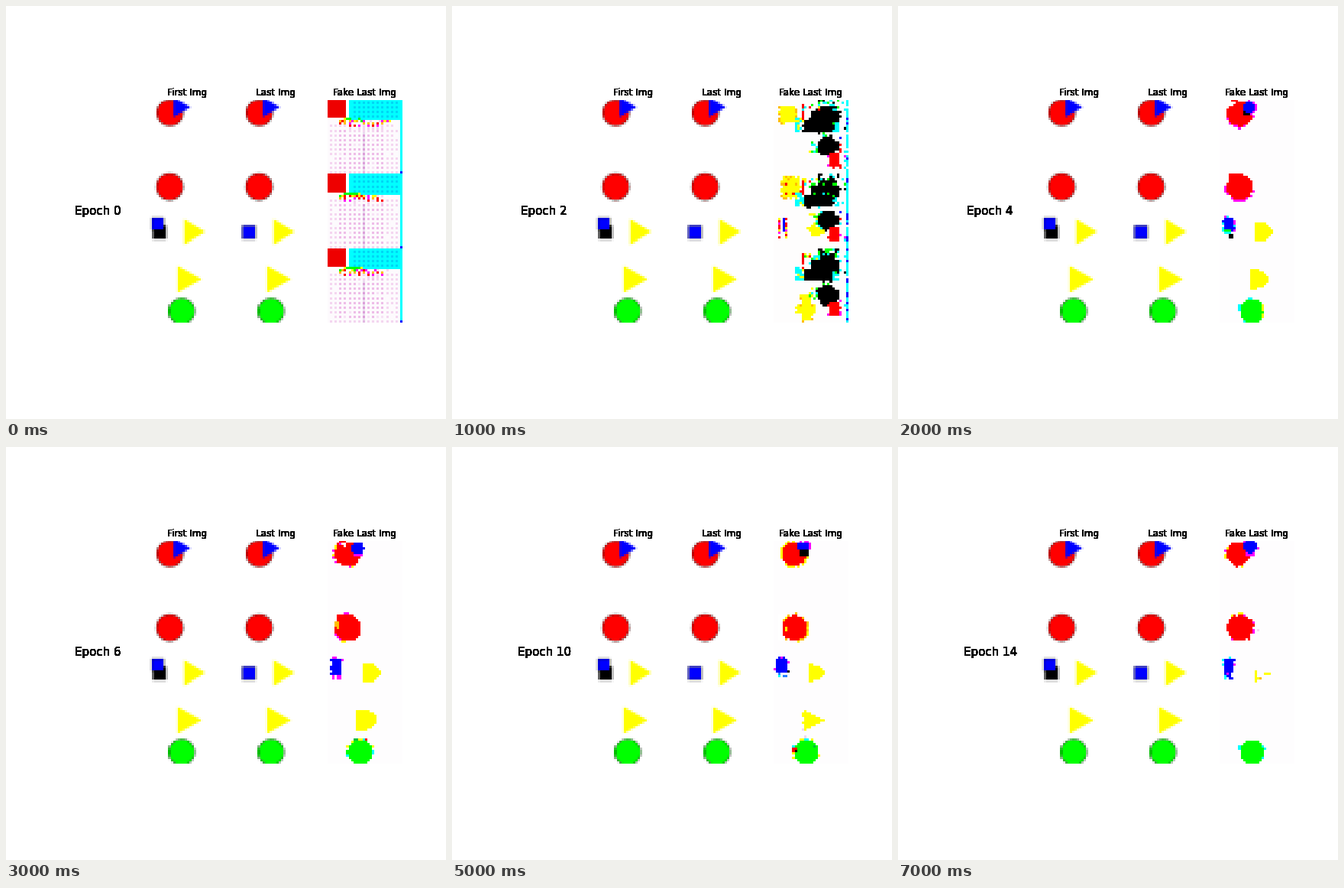
A matplotlib script for the animation above (7.5 s loop, 576 by 540 pixels).

```python
import matplotlib.pyplot as plt
import numpy as np
from matplotlib.animation import FuncAnimation

EPOCHS = 15
CELLS = 32
ROWS = 3 * CELLS
RGB = dict(R=(255, 0, 0), G=(0, 255, 0), B=(0, 0, 255), Y=(255, 255, 0),
           C=(0, 255, 255), M=(255, 0, 255), K=(0, 0, 0), W=(255, 255, 255),
           P=(244, 214, 240), D=(0, 190, 60), O=(255, 190, 0), L=(40, 130, 255))


class Canvas:
    """A 32 x 96 cell picture; `scale` subdivides cells for smooth edges."""

    def __init__(self, seed=0, bg=(255, 255, 255), scale=1):
        self.rng = np.random.default_rng(seed)
        self.scale = scale
        self.a = np.full((ROWS * scale, CELLS * scale, 3), bg, float)
        gy, gx = np.mgrid[:ROWS * scale, :CELLS * scale]
        self.x, self.y = (gx + 0.5) / scale, (gy + 0.5) / scale

    def fill(self, mask, color, rim="", p=0.6, side=(0, 0)):
        self.a[mask] = RGB[color]
        if not rim or not mask.any():
            return
        big = np.pad(mask, 1)
        ring = (big[2:, 1:-1] | big[:-2, 1:-1] | big[1:-1, 2:] | big[1:-1, :-2]) & ~mask
        dx, dy = self.x - self.x[mask].mean(), self.y - self.y[mask].mean()
        ring &= dx * side[0] + dy * side[1] >= 0
        self.scatter(ring, rim, p)

    def scatter(self, mask, colors, p):
        hit = np.argwhere(mask & (self.rng.random(mask.shape) < p))
        for i, j in hit:
            self.a[i, j] = RGB[colors[self.rng.integers(len(colors))]]

    def area(self, x, y, w, h):
        return (self.x >= x) & (self.x < x + w) & (self.y >= y) & (self.y < y + h)

    def box(self, x, y, w, h, color, *rim):
        self.fill(self.area(x, y, w, h), color, *rim)

    def disc(self, x, y, r, color, *rim):
        self.fill(np.hypot(self.x - x, self.y - y) < r, color, *rim)

    def tri(self, x, y, w, h, color, *rim):
        t = (self.x - x) / w
        self.fill((t >= 0) & (np.abs(self.y - y) < h / 2 * (1 - t)), color, *rim)

    def dome(self, x, y, w, h, color, *rim):
        t = (self.x - x) / w
        self.fill((t >= 0) & (np.hypot(t, (self.y - y) * 2 / h) < 1), color, *rim)

    def spray(self, x, y, w, h, colors, p):
        self.scatter(self.area(x, y, w, h), colors, p)

    def image(self):
        s = self.scale
        a = self.a.reshape(ROWS, s, CELLS, s, 3).mean(axis=(1, 3))
        return a.round().astype(np.uint8)


def real(first):
    c = Canvas(scale=8)

    def square(x, y, size, color):
        c.box(x, y, size, size, "K")
        c.box(x + 0.25, y + 0.25, size - 0.5, size - 0.5, color)

    for x, y, color in ((8.7, 5.85, "R"), (8.6, 37.6, "R"), (13.7, 91, "G")):
        c.disc(x, y, 5.75, "K")
        c.disc(x, y, 5.5, color)
    c.tri(10.1, 3.4, 7.4, 8.8, "B")
    c.tri(14.7, 57, 9.3, 11, "Y")
    c.tri(11.9, 77.4, 10.5, 11.6, "Y")
    square(1.4, 54.3, 5.8, "K")
    if first:
        square(0.9, 50.9, 5.4, "B")
    else:
        square(1.4, 54.3, 5.8, "B")
    return c.image()


def start():
    c = Canvas(5, (253, 250, 253))
    odd_col = np.floor(c.x) % 2 == 1
    dots = odd_col & (np.floor(c.y) % 2 == 1)
    for y in (0, 32, 64):
        c.scatter(dots & c.area(0, y + 10, 31, 22), "P", 0.9)
        c.a[dots & c.area(5, y + 12, 20, 18)] -= (6, 24, 8)
        c.a[c.area(15, y + 13, 1, 19)] -= (18, 30, 14)
        c.box(9, y, 23, 8.6, "C")
        c.a[dots & c.area(10, y, 21, 8)] = (0, 215, 245)
        c.box(8, y, 1, 9, "W")
        c.box(0, y + 8, 9, 1, "W")
        c.a[c.area(0, y, 8, 8)] = (238, 0, 0)
        c.spray(7, y + 8, 8, 1, "GGYC", 0.9)
        c.spray(5, y + 9, 11, 1, "RYMOG", 0.8)
        c.spray(16, y + 9, 11, 1, "MWYP", 0.6)
        c.scatter(odd_col & c.area(5, y + 10, 20, 1), "RMO", 0.8)
        c.scatter(odd_col & c.area(7, y + 11, 18, 1), "RMP", 0.55)
        c.scatter(odd_col & c.area(9, y + 12, 16, 2), "P", 0.7)
        c.box(31, y, 1, 31, "C")
        c.box(31, y + 31, 1, 1, "B")
    return c.image()


def wild(seed):
    c = Canvas(seed, (254, 253, 253))
    c.box(3, 3, 6, 7, "Y", "YO", 0.45)
    c.box(4, 34, 7, 8, "Y", "YO", 0.45)
    c.spray(4, 34, 9, 8, "OYR", 0.25)
    c.disc(18.5, 56, 3.2, "Y", "YW", 0.5)
    for x in (2, 5):
        c.spray(x, 51, 1, 9, "RMYR", 0.7)
    c.box(4, 51, 1, 6, "B")
    c.box(12, 84, 4, 11, "Y", "YO", 0.4)
    c.box(10, 89, 8, 3, "Y", "Y", 0.4)
    for y in (0, 32, 64):
        c.spray(12, y + 2, 9, 3, "CRWGY", 0.4)
        c.spray(19, y, 9, 4, "CKKG", 0.45)
        c.spray(9, y + 8, 4, 6, "CCCY", 0.85)
        c.spray(25, y + 10, 3, 4, "C", 0.9)
        c.box(20, y + 3, 6, 2, "K", "KCG", 0.4)
        c.box(16, y + 5, 12, 5, "K", "KKCG", 0.3)
        c.box(13, y + 9, 12, 5, "K", "KKCG", 0.3)
        c.spray(12, y + 2, 1, 7, "R", 0.8)
        c.spray(15, y + 17, 4, 6, "CYGW", 0.35)
        c.disc(23, y + 20, 3.9, "K", "KKGC", 0.45)
        c.box(21, y + 18, 7, 4, "K")
        c.box(24, y + 23, 4, 5.6, "R", "MKRW", 0.3)
        c.spray(28, y + 16, 3, 14, "MRBC", 0.12)
        c.spray(29, y, 2, 16, "CGK", 0.06)
        c.spray(31, y, 1, 32, "CCCCB", 0.92)
    return c.image()


def scene4(c):
    c.disc(8.7, 6.1, 5.5, "R", "M", 0.8, (0, 1))
    c.spray(4, 1, 4, 2, "W", 0.8)
    c.box(5, 0, 3, 1, "R")
    c.box(7, 1, 1, 2, "R")
    c.box(10, 5, 3, 2, "K")
    c.disc(12.6, 3.5, 2.6, "B", "M", 0.8, (1, -0.2))
    c.disc(8.6, 37.8, 5.5, "R", "M", 0.6, (-0.3, 1))
    c.spray(4, 33, 4, 1, "W", 1)
    c.box(4, 32, 4, 1.6, "R")
    c.box(2, 51, 4, 6, "B", "MBC", 0.6)
    c.spray(2, 56, 4, 2, "CGB", 0.7)
    c.box(4, 58, 2, 2, "K")
    c.dome(15, 57, 7.7, 8.8, "Y")
    c.dome(12.7, 77.4, 8.6, 9, "Y")
    c.disc(13.8, 91, 5.3, "G", "C", 0.7, (-1, 0))
    c.spray(18, 88, 1, 6, "Y", 0.8)


def scene6(c):
    c.disc(8.6, 6, 5.4, "R", "MY", 0.5, (-1, 0.5))
    c.spray(4, 1, 4, 2, "WR", 0.6)
    c.box(5, 0, 3, 1, "R")
    c.box(11, 5, 4, 2, "M")
    c.disc(12.7, 3.4, 2.9, "B")
    c.disc(8.8, 37.8, 5.6, "R", "YM", 0.35, (-1, 0))
    c.spray(3, 35, 2, 3, "YOW", 0.7)
    c.box(4, 32, 4, 1.6, "R")
    c.box(2, 51, 4, 7, "B", "BM", 0.4)
    for x in (2, 4, 5):
        c.box(x, 58, 1, 2, "M")
    c.dome(15, 57, 7.7, 8.8, "Y")
    c.dome(12.2, 77.4, 9.2, 9.6, "Y")
    c.disc(13.9, 91, 5.5, "G", "CY", 0.4)
    c.spray(11, 85, 6, 1, "YRD", 0.6)


def scene8(c):
    c.box(4, 0, 6, 8, "R", "YR", 0.5, (-1, 0.5))
    c.spray(4, 7, 6, 3, "RRW", 0.6)
    c.disc(12.3, 3.6, 3, "M", "MW", 0.4)
    for x in (9, 11, 13):
        c.spray(x, 0, 1, 10, "M", 0.7)
    c.box(12, 3, 3, 2, "B")
    c.disc(8.7, 37.6, 4.9, "R", "YM", 0.6)
    c.spray(3, 36, 3, 5, "YRO", 0.6)
    for x in (4, 6, 9, 11):
        c.spray(x, 40, 1, 3, "YRM", 0.6)
        c.spray(x + 1, 41, 1, 3, "W", 0.9)
    c.box(2, 51, 4, 7, "B", "BM", 0.35)
    c.spray(3, 56, 3, 3, "LCB", 0.5)
    c.spray(2, 59, 4, 1, "MW", 0.7)
    c.dome(15, 57, 7, 8, "Y")
    c.tri(13.2, 77.4, 8, 8.5, "Y", "OY", 0.3, (-1, 0))
    c.disc(13.7, 91, 5.3, "G", "YOD", 0.4)
    c.spray(10, 87, 8, 8, "D", 0.18)


def scene10(c):
    c.disc(8.8, 5.9, 5.3, "R", "Y", 0.8)
    c.box(11, 4, 4, 3, "K")
    c.box(10, 1, 5, 3, "B", "M", 0.5, (0.5, -1))
    c.disc(9, 37.7, 5.4, "R", "YO", 0.75)
    c.spray(2, 32, 2, 11, "W", 1)
    c.box(5, 37, 1, 2, "Y")
    c.box(1, 51, 5, 6, "B", "BM", 0.3)
    c.spray(2, 57, 4, 2, "LCW", 0.7)
    c.box(6, 56, 1, 1, "K")
    c.dome(15, 57, 6.7, 7.4, "Y")
    c.tri(13.2, 77.4, 8.6, 8.5, "Y", "YP", 0.35, (-1, 0))
    c.spray(12, 82, 3, 4, "PC", 0.2)
    c.disc(13.9, 91, 5.3, "G", "CY", 0.4)
    c.spray(8, 89, 2, 2, "RKD", 0.8)
    c.spray(10, 87, 8, 8, "D", 0.05)


def scene14(c):
    c.disc(8, 5.8, 5, "R", "MYR", 0.5, (-1, 0.4))
    c.box(11, 4, 4, 3, "M")
    c.disc(12.8, 2.7, 2.9, "B", "BM", 0.3)
    c.disc(8.7, 37.8, 5.4, "R", "YRM", 0.4)
    c.box(16, 38, 1, 1, "P")
    c.box(2, 51, 4, 6, "B", "BCM", 0.5)
    c.spray(2, 57, 4, 3, "MBC", 0.6)
    c.box(15, 56, 1, 5, "Y")
    c.spray(16, 58, 4, 2, "YO", 0.4)
    c.box(20, 57, 1, 1, "Y")
    c.box(19, 56.6, 3, 1, "Y")
    c.disc(13.8, 91, 5.3, "G", "C", 0.55, (1, 0.6))
    c.spray(8, 88, 1, 4, "YC", 0.5)


def scene12(c):
    scene14(c)
    c.tri(13.2, 77.4, 7, 7, "Y", "Y", 0.3)
    c.spray(20, 50, 9, 10, "YP", 0.06)


SCENES = {4: scene4, 6: scene6, 8: scene8, 10: scene10, 12: scene12, 14: scene14}


def fake(epoch):
    if epoch == 0:
        return start()
    if epoch < 3:
        return wild(epoch)
    c = Canvas(epoch, (254, 253, 254))
    SCENES[epoch + epoch % 2](c)
    return c.image()


plt.rcParams.update({"font.family": "DejaVu Sans", "font.size": 10,
                     "figure.subplot.bottom": 0.125})
fig, axes = plt.subplots(1, 4, figsize=(8, 7.5), dpi=72)
for ax in axes:
    ax.axis("off")


def heavy(ax, x, y, text, **kw):
    # stacked copies harden the antialiased edges
    return [ax.annotate(text, (x, y), xycoords="axes fraction", ha="center", **kw)
            for _ in range(25)]


fakes = [fake(e) for e in range(EPOCHS)]
pictures = (real(True), real(False), fakes[0])
titles = ("First Img", "Last Img", "Fake Last Img")
for ax, pic, title in zip(axes[1:], pictures, titles):
    shown = ax.imshow(pic, interpolation="nearest")
    heavy(ax, 0.5, 1, title, xytext=(0, 6), textcoords="offset points",
          fontsize=12, va="baseline")
labels = heavy(axes[0], 0.5, 0.5, "Epoch 0", fontsize=15, va="center")


def update(epoch):
    shown.set_data(fakes[epoch])
    for label in labels:
        label.set_text(f"Epoch {epoch}")
    return [shown, *labels]


anim = FuncAnimation(fig, update, frames=EPOCHS, interval=500,
                     repeat=True, repeat_delay=0)
plt.show()
```
